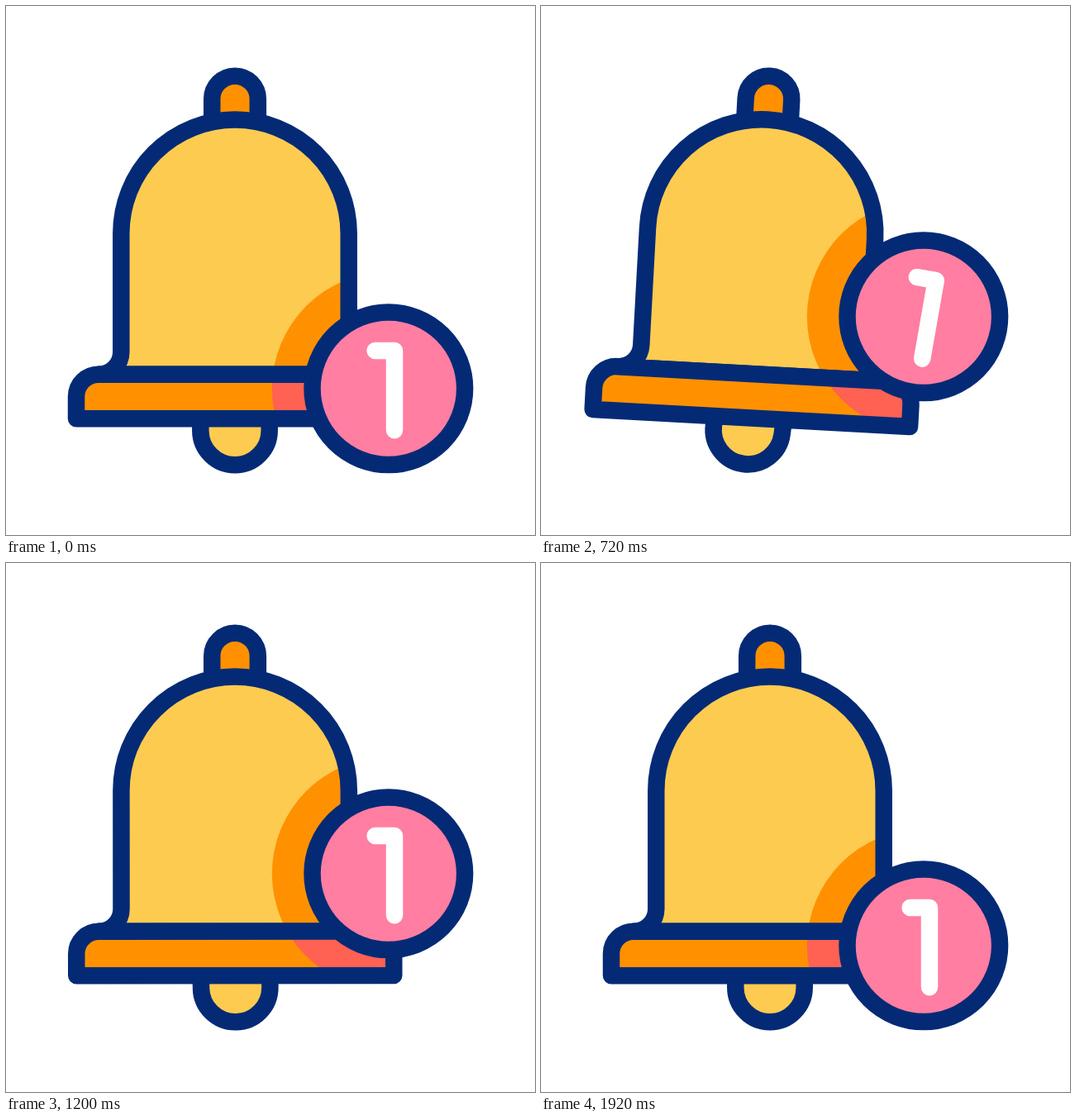
An HTML page with a canvas that plays this animation: 640 px wide and 640 px high, repeating every 2000 ms.

```html
<!DOCTYPE html>
<html lang="en">
<head>
<meta charset="utf-8">
<title>Notification bell</title>
<style>
  html, body { margin: 0; width: 100%; height: 100%; overflow: hidden; background: #fff; }
  canvas { display: block; width: 640px; height: 640px; }
</style>
</head>
<body>
<canvas width="640" height="640"></canvas>
<script>
const ctx = document.querySelector('canvas').getContext('2d');
const LOOP = 2000, STEP = 40;
const NAVY = '#042a76', YELLOW = '#fdcb50', ORANGE = '#ff9100', RED = '#ff6152', PINK = '#ff7ea1';
const CX = 277, PIVOT_Y = 84.5, CLAPPER_Y = 472.5;
const BADGE = 462.8;

const knob = new Path2D('M249.2 138V112.5a27.8 27.8 0 0 1 55.6 0V138');
const body = new Path2D('M112 445.7a27.3 27.3 0 0 0 27.3-27.3V275.2a137.7 137.7 0 0 1 275.4 0V418.4a27.3 27.3 0 0 0 27.3 27.3z');
const base = new Path2D('M85 499.2V472.7a27 27 0 0 1 27-27H442a27 27 0 0 1 27 27V499.2z');
const clapper = new Path2D('M235.3 480V513.6a41.7 41.7 0 0 0 83.4 0V480');
const digit = new Path2D('M-16.2-45.7H7.2V50.4');

// Keyframes as [time in ms, value], eased in and out between neighbours
const bellKeys = [[80, 0], [480, -5.9], [920, 10], [1320, -2.8], [1920, 0]];
const clapperKeys = [[80, 0], [480, -14.4], [920, 19], [1320, -6], [1920, 0]];
const liftKeys = [[80, 0], [440, -116], [620, -87], [1320, -87], [1680, 30], [1860, 0]];
const digitKeys = [[560, 0], [720, 10], [880, -10], [1040, 10], [1200, 0]];

function valueAt(keys, t) {
  const i = keys.findIndex(k => k[0] > t);
  if (i < 0) return keys[keys.length - 1][1];
  if (i === 0) return keys[0][1];
  const [t0, a] = keys[i - 1], [t1, b] = keys[i];
  const x = (t - t0) / (t1 - t0);
  return a + (b - a) * x * x * (3 - 2 * x);
}

function rotate(deg, x, y) {
  ctx.translate(x, y);
  ctx.rotate(deg * Math.PI / 180);
  ctx.translate(-x, -y);
}

function disc(y, r) {
  const path = new Path2D();
  path.arc(BADGE, y, r, 0, 2 * Math.PI);
  return path;
}

function shape(path, fill, shade, shadow) {
  ctx.fillStyle = fill;
  ctx.fill(path);
  if (shade) {
    ctx.save();
    ctx.clip(path);
    ctx.resetTransform();
    ctx.fillStyle = shade;
    ctx.fill(shadow);
    ctx.restore();
  }
  ctx.stroke(path);
}

function draw(t) {
  const y = BADGE + valueAt(liftKeys, t);
  const shadow = disc(y, 141);
  ctx.clearRect(0, 0, 640, 640);
  ctx.lineWidth = 20.5;
  ctx.lineJoin = 'round';
  ctx.strokeStyle = NAVY;

  ctx.save();
  rotate(valueAt(bellKeys, t), CX, PIVOT_Y);
  ctx.save();
  rotate(valueAt(clapperKeys, t), CX, CLAPPER_Y);
  shape(clapper, YELLOW);
  ctx.restore();
  shape(knob, ORANGE);
  shape(body, YELLOW, ORANGE, shadow);
  shape(base, ORANGE, RED, shadow);
  ctx.restore();

  shape(disc(y, 92.3), PINK);
  ctx.save();
  ctx.translate(BADGE, y);
  rotate(valueAt(digitKeys, t), 0, 0);
  ctx.lineCap = 'round';
  ctx.strokeStyle = '#fff';
  ctx.stroke(digit);
  ctx.restore();
}

const start = performance.now();
function frame() {
  const t = (performance.now() - start) % LOOP;
  draw(Math.floor(t / STEP) * STEP);
  requestAnimationFrame(frame);
}
frame();
</script>
</body>
</html>
```
